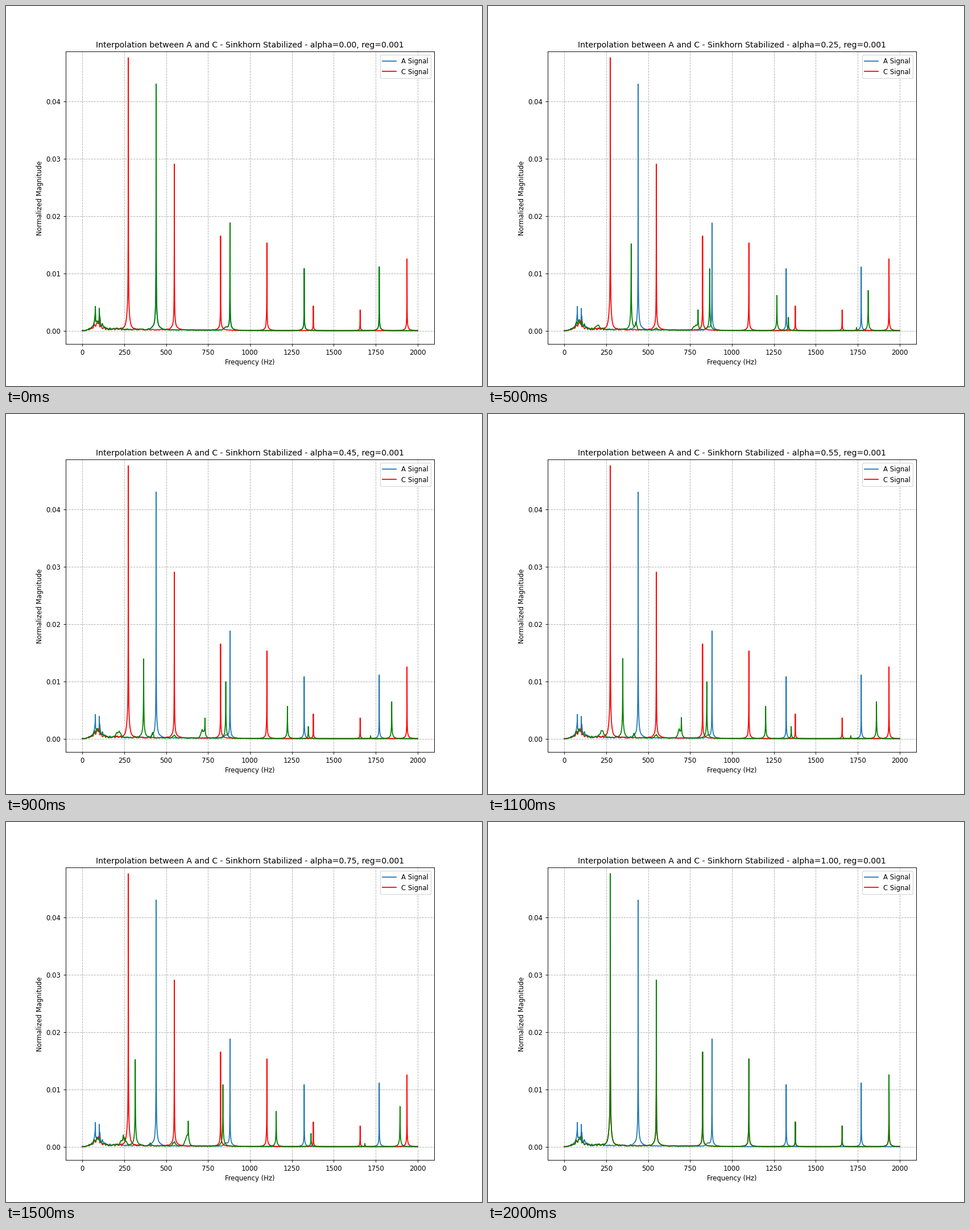
A matplotlib script that plays this animation: 837 px wide and 669 px high, repeating every 2.1 s.

```python
import numpy as np
import matplotlib.pyplot as plt
from matplotlib.animation import FuncAnimation

W, H, DPI = 837, 669, 83.7
STEPS = 21
freq = np.linspace(0, 2000, 4001)


def peak(center, height, width=0.45, reach=40):
    """Narrow spectral line with leakage skirts, snapped to a bin."""
    d = np.abs(freq - round(center * 2) / 2)
    return height / (1 + d / width) * np.exp(-d / reach)


def bump(center, height, spread):
    return height * np.exp(-((freq - center) / spread) ** 2)


def noise(seed, step=5):
    """Smooth positive noise between 0 and 1."""
    knots = np.arange(0, 2000 + step, step)
    return np.interp(freq, knots, np.random.default_rng(seed).random(len(knots)))


def hum(seed):
    """Low rumble around 95 Hz over a decaying noise floor."""
    rise = np.clip((freq - 15) / 40, 0, 1)
    level = bump(95, 0.0011, 32) + 0.0006 * rise * np.exp(-freq / 330)
    return level * (0.3 + noise(seed)) + 0.00004 + bump(700, 0.00005, 250)


def spectrum(base, lines):
    return base + sum(peak(f, h) for f, h in lines)


LINES_A = [(440.5, 0.0428), (881, 0.0187), (1323.5, 0.0108), (1771, 0.0111)]
LINES_C = [(274.5, 0.0462), (549, 0.0289), (825, 0.0164), (1101, 0.0152),
           (1378, 0.0043), (1657, 0.0036), (1936.5, 0.0125)]

hum_a, hum_c = hum(3), hum(8)
sig_a = (spectrum(hum_a, LINES_A) + bump(855, 0.0004, 14)
         + peak(78, 0.0031, 1.6, 8) + peak(101.5, 0.003, 1.6, 8))
sig_c = (spectrum(hum_c, LINES_C) + bump(272, 0.0012, 10)
         + bump(1098, 0.0006, 2))

# Transport plan: line of A, line of C, height midway
PLAN = [(0, 0, 0.0137), (1, 1, 0.0031), (1, 2, 0.0098), (2, 3, 0.0056),
        (2, 4, 0.0021), (3, 5, 0.0005), (3, 6, 0.0064)]
# Broad parts: start, end, spread, first and last height
HUMPS = [(858, 545, 14, 0.0006, 0.0016), (550, 550, 12, 0.0001, 0.001),
         (175, 268, 18, 0.0002, 0.0018), (440, 395, 6, 0.0014, 0.0001)]


def mix(p, q, a):
    return p + a * (q - p)


def blend(a):
    if a == 0:
        return sig_a
    if a == 1:
        return sig_c
    y = mix(hum_a, hum_c, a) + (1 - a) * bump(88, 0.0006, 14)
    grain = 0.6 + 0.8 * noise(5)
    for start, end, spread, low, high in HUMPS:
        y = y + bump(mix(start, end, a), mix(low, high, a), spread) * grain
    sag = 1 + 1.5 * (a - 0.5) ** 2
    for i, j, height in PLAN:
        center = mix(LINES_A[i][0], LINES_C[j][0], a)
        y = y + peak(center, height * sag, 1.1, 28)
    return y


# The tiny excess keeps float rounding from losing a pixel
fig, ax = plt.subplots(figsize=((W + 1e-6) / DPI, (H + 1e-6) / DPI), dpi=DPI)
ax.plot(freq, sig_a, label="A Signal")
ax.plot(freq, sig_c, "r", label="C Signal")
line, = ax.plot(freq, sig_a, "g")
ax.set_xlim(-100, 2100)
ax.set_ylim(-0.00232, 0.04867)
ax.set_yticks(np.arange(5) / 100)
ax.set_xlabel("Frequency (Hz)")
ax.set_ylabel("Normalized Magnitude")
ax.grid(linestyle="--")
ax.legend(loc="upper right")


def update(i):
    a = i / (STEPS - 1)
    line.set_ydata(blend(a))
    ax.set_title("Interpolation between A and C - Sinkhorn Stabilized - "
                 f"alpha={a:.2f}, reg=0.001")
    return line,


anim = FuncAnimation(fig, update, frames=STEPS, interval=100,
                     repeat=True, repeat_delay=0)
plt.show()
```
